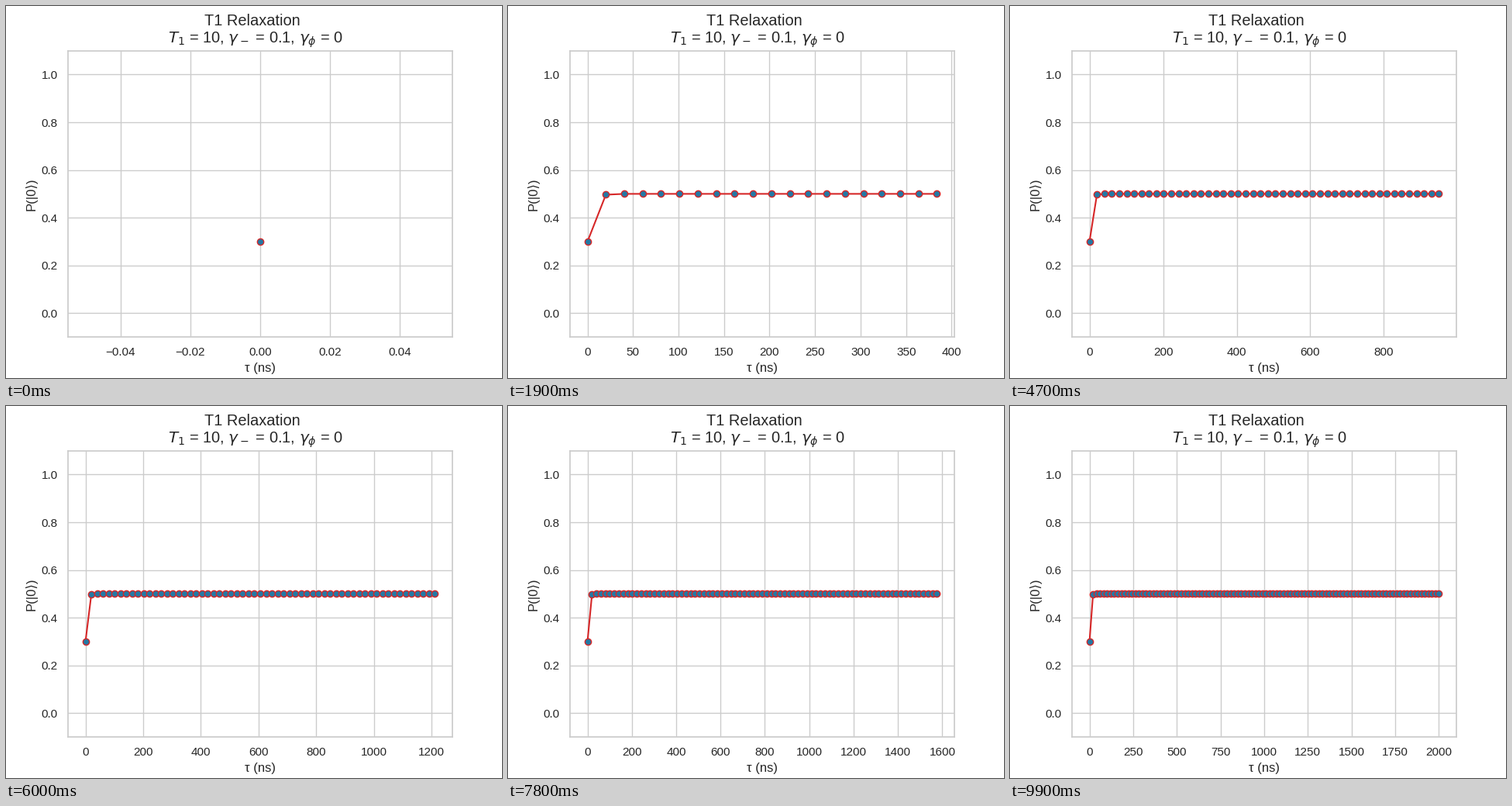
Recreate the animation shown at these times as a matplotlib script. Size 640 by 480 pixels, loop 10 s.

```python
import matplotlib.pyplot as plt
import numpy as np
from matplotlib.animation import FuncAnimation

INK, GRID = "0.15", "0.8"
RED, BLUE = "#d62728", "#2478a4"
FRAMES = 100

plt.rcParams.update({
    "font.family": ["Liberation Sans", "DejaVu Sans"],
    "font.size": 12,
    "text.color": INK,
    "axes.labelcolor": INK,
    "axes.labelsize": 12,
    "axes.edgecolor": GRID,
    "axes.linewidth": 1.25,
    "axes.grid": True,
    "axes.axisbelow": True,
    "grid.color": GRID,
    "grid.linewidth": 1,
    "lines.solid_capstyle": "round",
    "lines.linewidth": 1.5,
    "lines.markersize": 6,
})
for axis, side in (("xtick", "bottom"), ("ytick", "left")):
    plt.rcParams.update({
        f"{axis}.color": INK,
        f"{axis}.labelsize": 11,
        f"{axis}.major.size": 6,
        f"{axis}.major.width": 1.25,
        f"{axis}.{side}": False,
    })

# Relaxation from P = 0.3 towards the mixed state
T1 = 10
tau = np.linspace(0, 2000, FRAMES)
prob = 0.5 - 0.2 * np.exp(-2 * tau / T1)

fig, ax = plt.subplots(figsize=(6.4, 4.8), dpi=100)
title = dict(y=0.98, ha="left", va="top", fontsize=14.4)
fig.text(255.9 / 640, s="T1 Relaxation", **title)
fig.text(209 / 640,
         s="\n$T_1$ = 10, $\\gamma_-$ = 0.1, $\\gamma_\\phi$ = 0", **title)
ax.set_xlabel("τ (ns)")
ax.set_ylabel("P(|0⟩)")
ax.set_ylim(-0.1, 1.1)

curve, = ax.plot([], [], "o-", color=RED, markerfacecolor=BLUE,
                 markeredgecolor=RED, markeredgewidth=1)


def update(i):
    curve.set_data(tau[:i + 1], prob[:i + 1])
    # 5 % margins; a lone point gets a tiny window around it
    if i:
        ax.set_xlim(-0.05 * tau[i], 1.05 * tau[i])
    else:
        ax.set_xlim(-0.055, 0.055)
    return curve,


anim = FuncAnimation(fig, update, frames=FRAMES, interval=100,
                     repeat=True, repeat_delay=0, blit=False)
plt.show()
```
